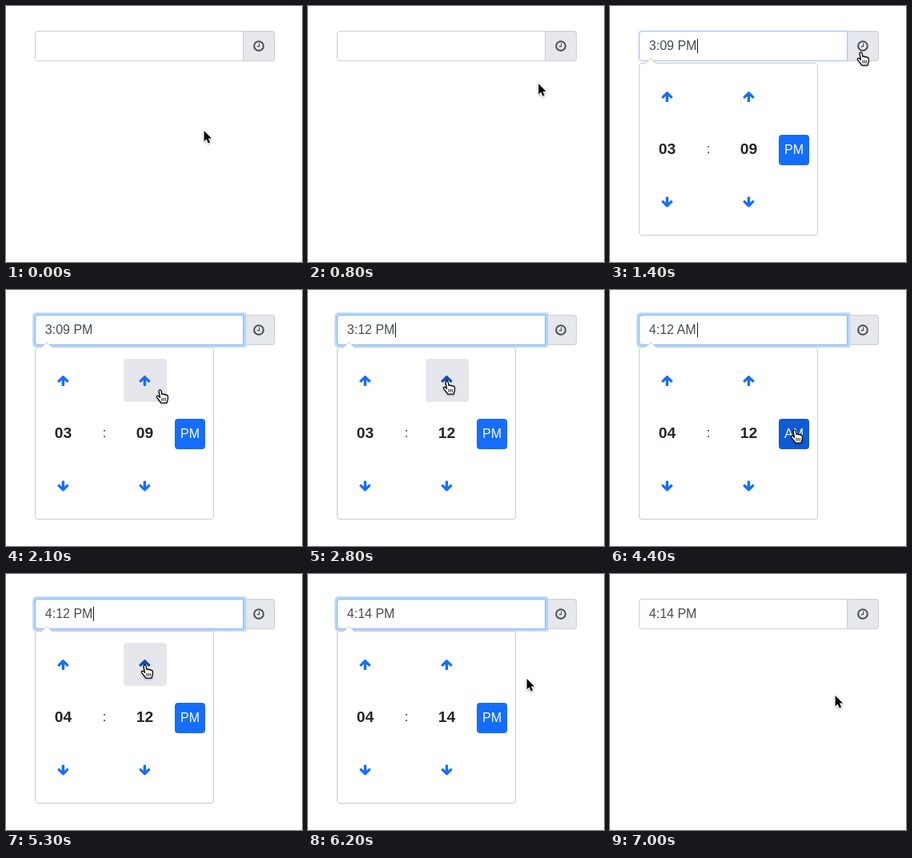
Animation of 370 by 320 pixels, one loop 7.4 s. Source, as an HTML page:

```html
<!DOCTYPE html>
<html lang="en">
<head>
<meta charset="utf-8">
<title>Time picker</title>
<style>
  html, body { margin: 0; width: 100%; height: 100%; overflow: hidden; background: #fff; }
  svg { display: block; width: 370px; height: 320px; }
  text { font: 16px "Liberation Sans", Arial, sans-serif; fill: #212529; }
  .big { font-size: 19.2px; font-weight: bold; }
  .mid { text-anchor: middle; }
  #cursor { filter: drop-shadow(0 1px 1px rgba(0, 0, 0, .3)); }
</style>
</head>
<body>
<svg viewBox="0 0 370 320">
  <defs>
    <path id="up" transform="scale(.00893) translate(-832 -928)" d="M1611 971q0 51-37 90l-75 75q-38 38-91 38-54 0-90-38L1024 843v704q0 52-37.5 84.5T896 1664H768q-53 0-90.5-32.5T640 1547V843L346 1136q-36 38-90 38t-90-38l-75-75q-38-38-38-90 0-53 38-91L742 229q35-37 90-37 54 0 91 37l651 651q37 39 37 91z"/>
  </defs>

  <rect x="36.5" y="31.5" width="299" height="37" rx="3.5" fill="#fff" stroke="#c9ced5"/>
  <path d="M296.5 31.5H332a3.5 3.5 0 0 1 3.5 3.5v30a3.5 3.5 0 0 1-3.5 3.5H296.5z" fill="#e6e8ec" stroke="#c9ced5"/>
  <g fill="none" stroke="#454c54">
    <circle cx="316" cy="50" r="5.85" stroke-width="2"/>
    <path d="M316.6 46.6v4.1h-2.9" stroke-width="1.15"/>
  </g>

  <g id="focus" fill="none">
    <path id="glow" d="M38 29.9H298.6V70.1H38a3.1 3.1 0 0 1-3.1-3.1V33a3.1 3.1 0 0 1 3.1-3.1z" stroke="#b5d5fc" stroke-width="3.2" stroke-linejoin="round"/>
    <path id="edge" d="M296.5 31.5H40a3.5 3.5 0 0 0-3.5 3.5v30a3.5 3.5 0 0 0 3.5 3.5H296.5z" stroke="#86b7f8"/>
  </g>
  <text id="value" x="48.8" y="55.3" style="fill:#454c55"></text>
  <path id="caret" d="M109.5 41v18" stroke="#222"/>

  <g id="popup">
    <rect x="36.5" y="71.5" width="223" height="215" rx="3.5" fill="#fff" stroke="#ccc"/>
    <path d="M44 72.2L51 65.6L58 72.2z" fill="#fff"/>
    <path d="M44 71.6L51 65.6L58 71.6" fill="none" stroke="#ccc"/>
    <rect id="hBox" x="45" y="86" width="54" height="54" rx="4" fill="#e6e7ec"/>
    <rect id="mBox" x="147" y="86" width="54" height="54" rx="4" fill="#e6e7ec"/>
    <g fill="#156dfd">
      <g id="hUp" transform="translate(71.4 113.5)"><use href="#up"/></g>
      <g id="mUp" transform="translate(173.4 113.5)"><use href="#up"/></g>
      <g transform="translate(71.4 245) scale(1 -1)"><use href="#up"/></g>
      <g transform="translate(173.4 245) scale(1 -1)"><use href="#up"/></g>
    </g>
    <text id="hour" class="big mid" x="71.4" y="185"></text>
    <text class="mid" x="123" y="184">:</text>
    <text id="minute" class="big mid" x="173.4" y="185"></text>
    <rect id="half" x="211" y="161" width="38" height="38" rx="4"/>
    <text id="halfText" class="mid" x="230" y="185" style="fill:#fff"></text>
  </g>

  <g id="cursor">
    <path id="arrow" d="M.6 1V14.2L3.6 11.4L5.8 16.4L8.1 15.4L5.9 10.6H10z" fill="#000" stroke="#fff" stroke-width="2" paint-order="stroke" stroke-linejoin="round"/>
    <g id="hand" stroke="#000" stroke-linejoin="round" stroke-linecap="round">
      <path d="M-.6 8.4L-1.9 1.8C-2.2-.4 .6-.8 1.1 1.3L2 5.6C2.4 4.4 4.2 4.6 4.5 6C5 5 6.6 5.2 7 6.7C7.6 5.8 9.2 6.2 9.3 7.9V10.8C9.3 13 8.1 13.8 8 16.2H.6C.2 14.4-1.6 13.2-2.8 11.3C-3.6 10-4.9 9.1-4.7 8.1C-4.3 6.7-2.2 7-.6 9.4z" fill="#fff" stroke-width="1.2"/>
      <path d="M1.9 10.2V13.4M4.1 10.2V13.4M6.3 10.2V13.4" fill="none" stroke-width=".9"/>
    </g>
  </g>
</svg>
<script>
const LOOP = 7400, STEP = 100, OPEN = 1400, CLOSE = 6300;
const $ = id => document.getElementById(id);
const show = (id, on) => $(id).setAttribute("visibility", on ? "inherit" : "hidden");
const pad = n => String(n).padStart(2, "0");

// pointer stops: time, x, y
const stops = [
  [400, 247, 155], [1100, 314, 58], [1600, 314, 58], [2100, 193, 125],
  [2300, 174, 114], [2800, 174, 114], [3200, 58, 111], [3600, 58, 111],
  [4000, 231, 175], [4500, 231, 175], [4700, 234, 184], [4900, 234, 182],
  [5200, 174, 114], [5700, 174, 114], [6200, 273, 130], [6400, 273, 130],
  [7000, 281, 151]
];

// picker changes: time, hour, minute, half of day
const edits = [
  [OPEN, 3, 9, "PM"], [2400, 3, 10, "PM"], [2600, 3, 11, "PM"], [2800, 3, 12, "PM"],
  [3300, 4, 12, "PM"], [4300, 4, 12, "AM"], [4900, 4, 12, "PM"],
  [5400, 4, 13, "PM"], [5700, 4, 14, "PM"]
];

const zones = {
  clock: [297, 31, 336, 69], h: [45, 86, 99, 140],
  m: [147, 86, 201, 140], half: [211, 161, 249, 199]
};

function pointer(t) {
  const i = stops.findIndex(s => s[0] > t);
  if (i === 0) return stops[0].slice(1);
  if (i < 0) return stops[stops.length - 1].slice(1);
  const [t0, x0, y0] = stops[i - 1], [t1, x1, y1] = stops[i];
  const p = (t - t0) / (t1 - t0), e = p * p * (3 - 2 * p);
  return [x0 + (x1 - x0) * e, y0 + (y1 - y0) * e];
}

function hovered(t) {
  const [x, y] = pointer(t);
  const open = t >= OPEN && t < CLOSE;
  return Object.keys(zones).find(k => {
    const [l, top, r, b] = zones[k];
    return (open || k === "clock") && x >= l && x <= r && y >= top && y <= b;
  });
}

function draw(t) {
  const open = t >= OPEN && t < CLOSE;
  const edit = edits.filter(e => e[0] <= t).pop();
  const over = hovered(t), before = hovered(t - STEP);

  const focus = t < OPEN || t >= CLOSE + STEP ? 0 : t < OPEN + STEP || !open ? .5 : 1;
  $("edge").setAttribute("opacity", focus);
  $("glow").setAttribute("opacity", focus === .5 ? .15 : focus);

  show("popup", open);
  $("value").textContent = edit ? `${edit[1]}:${pad(edit[2])} ${edit[3]}` : "";
  show("caret", open && (t - edit[0]) % 1000 < 500);
  if (edit) {
    $("hour").textContent = pad(edit[1]);
    $("minute").textContent = pad(edit[2]);
    $("halfText").textContent = edit[3];
  }
  for (const k of ["h", "m"]) {
    show(k + "Box", open && over === k);
    $(k + "Up").setAttribute("fill", over === k && before === k ? "#0c4ea8" : "#156dfd");
  }
  $("half").setAttribute("fill", over === "half" ? "#0e5bd3" : "#156dfd");

  const [x, y] = pointer(t);
  $("cursor").setAttribute("transform", `translate(${x.toFixed(1)} ${y.toFixed(1)})`);
  show("hand", !!over);
  show("arrow", !over);
}

const start = performance.now();
function tick() {
  const t = (performance.now() - start) % LOOP;
  draw(Math.floor(t / STEP) * STEP);
  requestAnimationFrame(tick);
}
tick();
</script>
</body>
</html>
```
